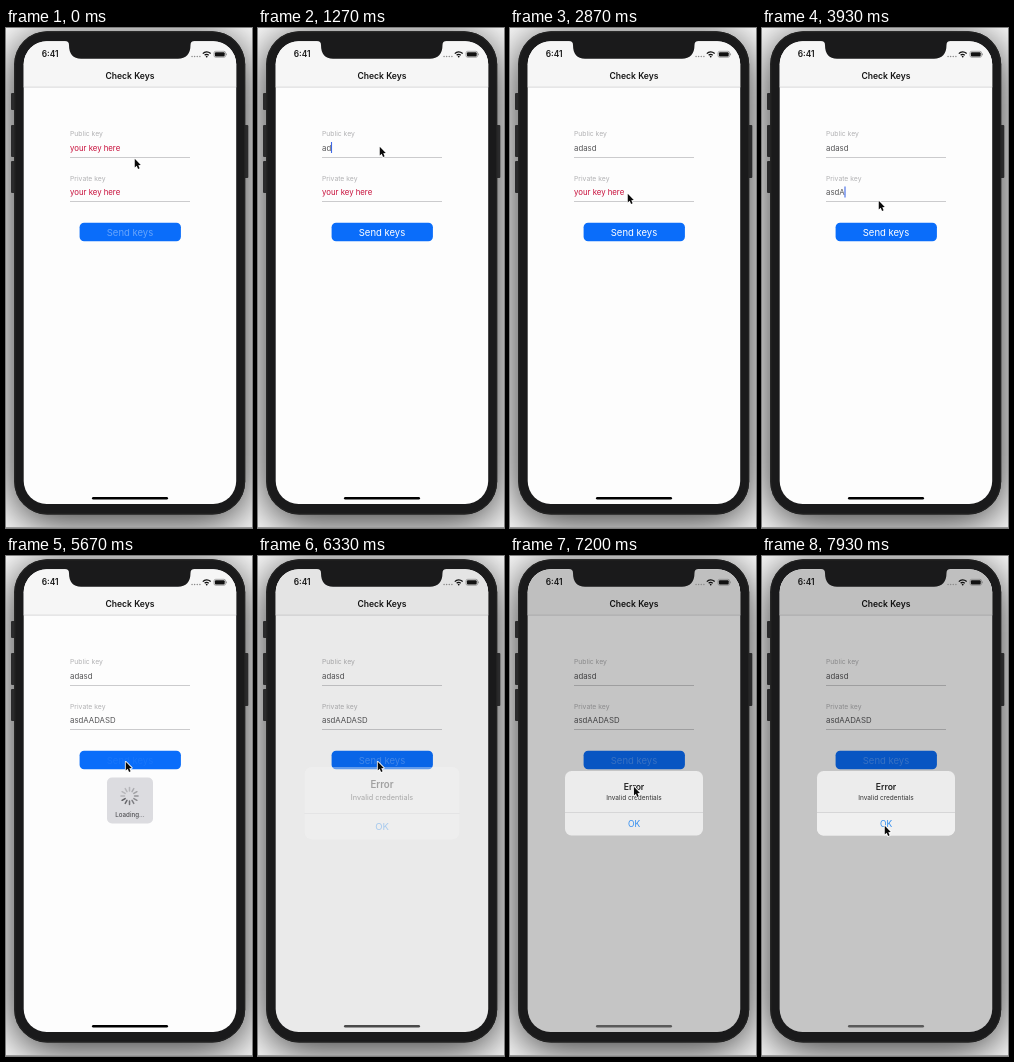
These frames come from a looping animation (246x500 px, 8000 ms). An HTML page with a canvas:

```html
<!DOCTYPE html>
<html lang="en">
<head>
<meta charset="utf-8">
<title>Check Keys</title>
<style>
  html, body { margin: 0; width: 100%; height: 100%; overflow: hidden; background: #fff; }
  canvas { display: block; width: 246px; height: 500px; }
</style>
</head>
<body>
<canvas id="stage"></canvas>
<script>
const W = 246, H = 500, LOOP = 8000, TICK = 1000 / 15;
const FONT = 'Inter, Roboto, sans-serif';
const ratio = window.devicePixelRatio || 1;

function setup(canvas) {
  canvas.width = W * ratio;
  canvas.height = H * ratio;
  const context = canvas.getContext('2d');
  context.scale(ratio, ratio);
  return context;
}

const ctx = setup(document.getElementById('stage'));
const backdrop = document.createElement('canvas');

const clamp = v => Math.max(0, Math.min(1, v));
const ramp = (t, from, to) => clamp((t - from) / (to - from));
const smooth = p => p * p * (3 - 2 * p);
const spring = x => x <= 0 ? 0 : 1 - (1 + x) * Math.exp(-x);
const gray = v => `rgb(${v},${v},${v})`;

function box(c, x, y, w, h, r, fill) {
  c.beginPath();
  c.roundRect(x, y, w, h, r);
  c.fillStyle = fill;
  c.fill();
}

function text(str, x, y, size, color, weight = 400, align = 'left') {
  ctx.font = `${weight} ${size}px ${FONT}`;
  ctx.textAlign = align;
  ctx.fillStyle = color;
  ctx.fillText(str, x, y);
}

function faded(alpha, draw) {
  ctx.save();
  ctx.globalAlpha *= alpha;
  draw();
  ctx.restore();
}

// Phone body with its soft shadow, drawn once
function drawBackdrop() {
  const c = setup(backdrop);
  c.fillStyle = '#fff';
  c.fillRect(0, 0, W, H);
  c.save();
  c.shadowColor = 'rgba(0,0,0,0.85)';
  c.shadowBlur = 46 * ratio;
  c.shadowOffsetY = 7 * ratio;
  box(c, 8.2, 3.3, 231, 483.2, 33, '#222');
  c.restore();
  for (const [y, h] of [[65, 17], [97, 32], [133, 32]]) box(c, 5, y, 5, h, 1, '#2a2a2b');
  box(c, 238, 97, 4.3, 53, 1, '#2a2a2b');
  box(c, 8.2, 3.3, 231, 483.2, 33, '#222');
  box(c, 9.5, 4.6, 228.4, 480.6, 31.7, '#1a1a1b');
  c.fillStyle = '#999';
  c.fillRect(0, 499, W, 1);
}

// Cursor stops: time, x, y
const path = [
  [0, 128, 130], [70, 127, 127], [330, 121, 118], [1500, 121, 118],
  [1800, 117, 225], [1930, 117, 225], [2130, 116, 198], [2670, 117, 197],
  [2870, 117, 165], [3600, 117, 166], [3930, 116, 172], [4130, 116, 172],
  [4470, 160, 212], [4930, 116, 199], [5400, 116, 199], [5600, 119, 205],
  [7000, 119, 205], [7270, 124, 235], [7530, 120, 263], [7640, 120, 263],
  [7730, 122, 269], [LOOP, 122, 269]
];

function cursorAt(t) {
  const i = path.findIndex(p => p[0] > t);
  const [t0, x0, y0] = path[i - 1], [t1, x1, y1] = path[i];
  const p = smooth(ramp(t, t0, t1));
  return [x0 + (x1 - x0) * p, y0 + (y1 - y0) * p];
}

function drawCursor(t) {
  const [x, y] = cursorAt(t);
  ctx.save();
  ctx.translate(x + 0.3, y + 0.8);
  ctx.scale(0.9, 0.9);
  ctx.beginPath();
  for (const [px, py] of [[0.5, 0], [0.5, 9.6], [2.7, 7.7], [4.2, 11.2], [5.9, 10.5], [4.4, 7.1], [7.2, 6.8]]) {
    ctx.lineTo(px, py);
  }
  ctx.closePath();
  ctx.lineJoin = 'round';
  ctx.lineWidth = 1.9;
  ctx.strokeStyle = '#fff';
  ctx.stroke();
  ctx.fillStyle = '#0a0a0a';
  ctx.fill();
  ctx.restore();
}

const keyed = (str, times, t) => str.slice(0, times.filter(at => t >= at).length);
const publicKeys = [1070, 1200, 1270, 1400, 1470];
const privateKeys = [3330, 3470, 3600, 3730, 4130, 4270, 4470, 4600, 4800];

function drawField(label, y, value, shift, caret) {
  text(label, 64, y - 21, 6.8, '#b2b2b4');
  ctx.save();
  ctx.translate(shift, 0);
  text(value || 'your key here', 64, y - 6.5, 7.8, value ? '#555557' : '#c8103c');
  const end = 64 + (value ? ctx.measureText(value).width : 0);
  ctx.fillStyle = '#cbcbcd';
  ctx.fillRect(64, Math.floor(y), 120, 1);
  faded(caret, () => {
    ctx.fillStyle = '#3f69e8';
    ctx.fillRect(end - 0.2, y - 15, 1.1, 11);
  });
  ctx.restore();
}

function buttonAlpha(t) {
  if (t < 2130) return 0.38 + 0.62 * ramp(t, 0, 330);
  if (t < 5590) return 0.1 + 0.9 * ramp(t, 2210, 2680);
  return 0.06 + 0.19 * ramp(t, 6190, 6330);
}

function drawStatus() {
  text('6:41', 35.7, 29.2, 8.4, '#161616', 600);
  for (let i = 0; i < 4; i++) box(ctx, 185.3 + i * 2.6, 27.7, 1.5, 1.5, 0.75, '#8a8a8a');
  ctx.strokeStyle = '#111';
  ctx.lineWidth = 1.3;
  for (const r of [2.8, 5.3]) {
    ctx.beginPath();
    ctx.arc(200.7, 29.2, r, -Math.PI * 0.76, -Math.PI * 0.24);
    ctx.stroke();
  }
  ctx.beginPath();
  ctx.arc(200.7, 28.6, 0.9, 0, 7);
  ctx.fillStyle = '#111';
  ctx.fill();
  ctx.lineWidth = 0.6;
  ctx.strokeStyle = '#777';
  ctx.beginPath();
  ctx.roundRect(208, 23.3, 11.6, 6, 1.7);
  ctx.stroke();
  box(ctx, 208.9, 24.2, 9.8, 4.2, 1, '#111');
  box(ctx, 220.1, 25.3, 0.8, 2, 0.4, '#888');
}

function drawLoader(t) {
  const alpha = ramp(t, 5560, 5650) * (1 - ramp(t, 6130, 6270));
  if (!alpha) return;
  faded(alpha, () => {
    box(ctx, 101, 221.5, 46, 46, 5, '#dcdce0');
    const lead = Math.floor(t / 1000 * 12);
    for (let i = 0; i < 12; i++) {
      const age = (lead - i) % 12;
      ctx.save();
      ctx.translate(123.5, 240);
      ctx.rotate(i * Math.PI / 6);
      box(ctx, -0.75, -9.3, 1.5, 5, 0.75, `rgba(70,70,74,${0.85 - Math.min(age, 8) * 0.075})`);
      ctx.restore();
    }
    text('Loading…', 124, 261, 6.2, '#505054', 500, 'center');
  });
}

function drawAlert(t, dim) {
  const alpha = clamp(dim * 1.15);
  if (!alpha) return;
  const scale = 1.17 - 0.17 * spring((t - 6270) * 0.0165);
  ctx.save();
  ctx.translate(124, 247);
  ctx.scale(scale, scale);
  ctx.translate(-124, -247);
  faded(alpha, () => {
    box(ctx, 55, 215, 138, 64.5, 6.5, gray(236 + 12 * (1 - dim)));
    if (t >= 7860) box(ctx, 55, 256.5, 138, 23, [0, 0, 6.5, 6.5], '#f0f0f0');
    ctx.fillStyle = '#cdcdcf';
    ctx.fillRect(55, 256, 138, 0.7);
    text('Error', 124, 234, 8.6, '#222', 600, 'center');
    text('Invalid credentials', 124, 244, 6.5, '#333', 400, 'center');
    text('OK', 124, 271.3, 8.5, '#2f8cf0', 400, 'center');
  });
  ctx.restore();
}

function drawNotch() {
  ctx.beginPath();
  ctx.moveTo(59, 12);
  ctx.lineTo(59, 13);
  ctx.quadraticCurveTo(63, 13, 63, 17);
  ctx.bezierCurveTo(63, 26, 67, 30.7, 75, 30.7);
  ctx.lineTo(172, 30.7);
  ctx.bezierCurveTo(180, 30.7, 184.5, 26, 184.5, 17);
  ctx.quadraticCurveTo(184.5, 13, 188.5, 13);
  ctx.lineTo(188.5, 12);
  ctx.fillStyle = '#1a1a1b';
  ctx.fill();
}

function drawScreen(t) {
  const dim = spring((t - 6270) * 0.0185);
  ctx.save();
  ctx.beginPath();
  ctx.roundRect(17.7, 13.2, 212.5, 462.8, 23);
  ctx.clip();
  ctx.fillStyle = '#fdfdfd';
  ctx.fillRect(17, 13, 214, 463);
  ctx.fillStyle = '#f6f6f6';
  ctx.fillRect(17, 13, 214, 46);
  ctx.fillStyle = '#cfcfd1';
  ctx.fillRect(17, 58.7, 214, 0.8);
  text('Check Keys', 124, 50.8, 8.6, '#141414', 600, 'center');

  const publicCaret = ramp(t, 330, 400) * (1 - ramp(t, 1930, 2100));
  const privateCaret = ramp(t, 3060, 3200) * (1 - ramp(t, 5130, 5400));
  const shaken = t - 2133;
  const shake = shaken > 0 && shaken < 600
    ? -2.5 * Math.exp(-shaken / 280) * Math.sin(shaken / 67 * Math.PI / 2) : 0;
  drawField('Public key', 129, keyed('adasd', publicKeys, t), 0, publicCaret);
  drawField('Private key', 173.5, keyed('asdAADASD', privateKeys, t), shake, privateCaret);

  box(ctx, 73.6, 194.7, 101.3, 18.6, 4.5, '#0a6dfa');
  faded(buttonAlpha(t), () => text('Send keys', 124, 207.6, 9.5, '#fff', 400, 'center'));
  drawLoader(t);

  ctx.fillStyle = `rgba(0,0,0,${0.225 * dim})`;
  ctx.fillRect(17, 13, 214, 463);
  drawStatus();
  box(ctx, 86, 469, 76, 2.4, 1.2, gray(90 * clamp(dim * 2.5)));
  drawAlert(t, dim);
  ctx.restore();
  drawNotch();
}

const start = performance.now();

function frame() {
  const now = (performance.now() - start) % LOOP;
  // Steps at 15 per second, like a screen recording
  const t = Math.floor((now + 4) / TICK) * TICK % LOOP;
  ctx.drawImage(backdrop, 0, 0, W, H);
  drawScreen(t);
  drawCursor(t);
  requestAnimationFrame(frame);
}

drawBackdrop();
frame();
</script>
</body>
</html>
```
